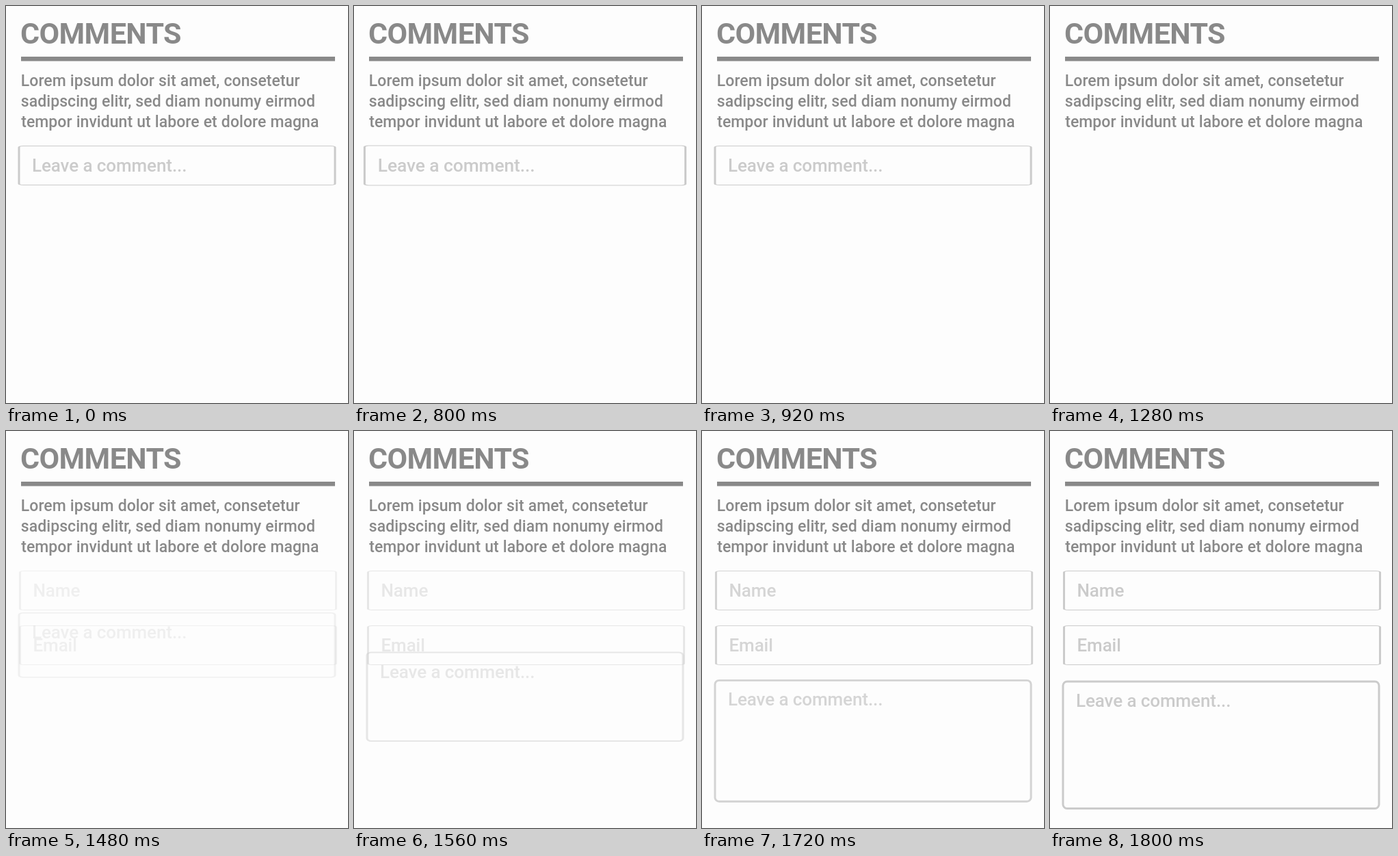
Recreate the animation shown at these times as an HTML page with a canvas. Size 500 by 580 pixels, loop 4000 ms.

```html
<!DOCTYPE html>
<html lang="en">
<head>
<meta charset="utf-8">
<title>Comment form</title>
<style>
  html, body { margin: 0; width: 100%; height: 100%; overflow: hidden; background: #fdfdfd; }
  canvas { display: block; width: 500px; height: 580px; }
</style>
</head>
<body>
<canvas id="stage" width="500" height="580"></canvas>
<script>
const ctx = document.getElementById('stage').getContext('2d');
const LOOP = 4000, STEP = 40;
const DARK = '#898989', LIGHT = '#cbcbcb';
const CENTER = 250, FULL_HEIGHT = 188.5, ROW_HEIGHT = 58;

const HEADING = { font: '700 43px Roboto, sans-serif', color: DARK, letter: '-0.6px', word: '0px' };
const BODY = { font: '500 23px Roboto, sans-serif', color: DARK, letter: '0.04px', word: '0.3px' };
const HINT = { font: '500 26px Roboto, sans-serif', color: LIGHT, letter: '-0.1px', word: '0px' };

function text(str, x, y, style) {
  ctx.font = style.font;
  ctx.letterSpacing = style.letter;
  ctx.wordSpacing = style.word;
  ctx.fillStyle = style.color;
  ctx.fillText(str, x, y);
}

// A tall rounded frame squeezed vertically, so its stroke thins with it.
function frame(cx, top, height) {
  ctx.save();
  ctx.translate(cx, top);
  ctx.scale(1, height / FULL_HEIGHT);
  ctx.beginPath();
  ctx.roundRect(-231, 1.5, 462, FULL_HEIGHT - 3, 6);
  ctx.strokeStyle = LIGHT;
  ctx.lineWidth = 3;
  ctx.stroke();
  ctx.restore();
}

function field(label, cx, top, height = ROW_HEIGHT) {
  frame(cx, top, height);
  text(label, cx - 212, top + 38.3, HINT);
}

function header() {
  text('COMMENTS', 20.9, 55, HEADING);
  ctx.fillStyle = DARK;
  ctx.fillRect(22, 74, 459, 6.5);
  text('Lorem ipsum dolor sit amet, consetetur', 21.8, 117, BODY);
  text('sadipscing elitr, sed diam nonumy eirmod', 21.8, 147, BODY);
  text('tempor invidunt ut labore et dolore magna', 22.2, 177, BODY);
}

// Short click pulse between 800 and 920 ms.
function pulse(t) {
  if (t < 800 || t >= 920) return 1;
  return 1 + [0.0155, 0.041, 0.018][(t - 800) / STEP];
}

function closedForm(t) {
  const s = pulse(t);
  ctx.save();
  ctx.translate(CENTER, 233);
  ctx.scale(s, s);
  ctx.translate(-CENTER, -233);
  field('Leave a comment...', CENTER, 204);
  ctx.restore();
}

function openForm(t) {
  const left = Math.max(0, (1800 - t) / 320);
  ctx.globalAlpha = 1 - 0.73 * left;
  field('Name', CENTER + 1.5, 204);
  field('Email', CENTER + 1.5, 284);
  field('Leave a comment...', CENTER, 364.5 - 99.5 * left ** 3, FULL_HEIGHT - 93 * left ** 1.7);
  ctx.globalAlpha = 1;
}

function draw(now) {
  const t = Math.floor((now % LOOP) / STEP) * STEP;
  ctx.fillStyle = '#fdfdfd';
  ctx.fillRect(0, 0, 500, 580);
  header();
  if (t < 1280) closedForm(t);
  else if (t >= 1480) openForm(t);
}

let start = null;
function tick(now) {
  if (start === null) start = now;
  draw(now - start);
  requestAnimationFrame(tick);
}
draw(0);
requestAnimationFrame(tick);
</script>
</body>
</html>
```
